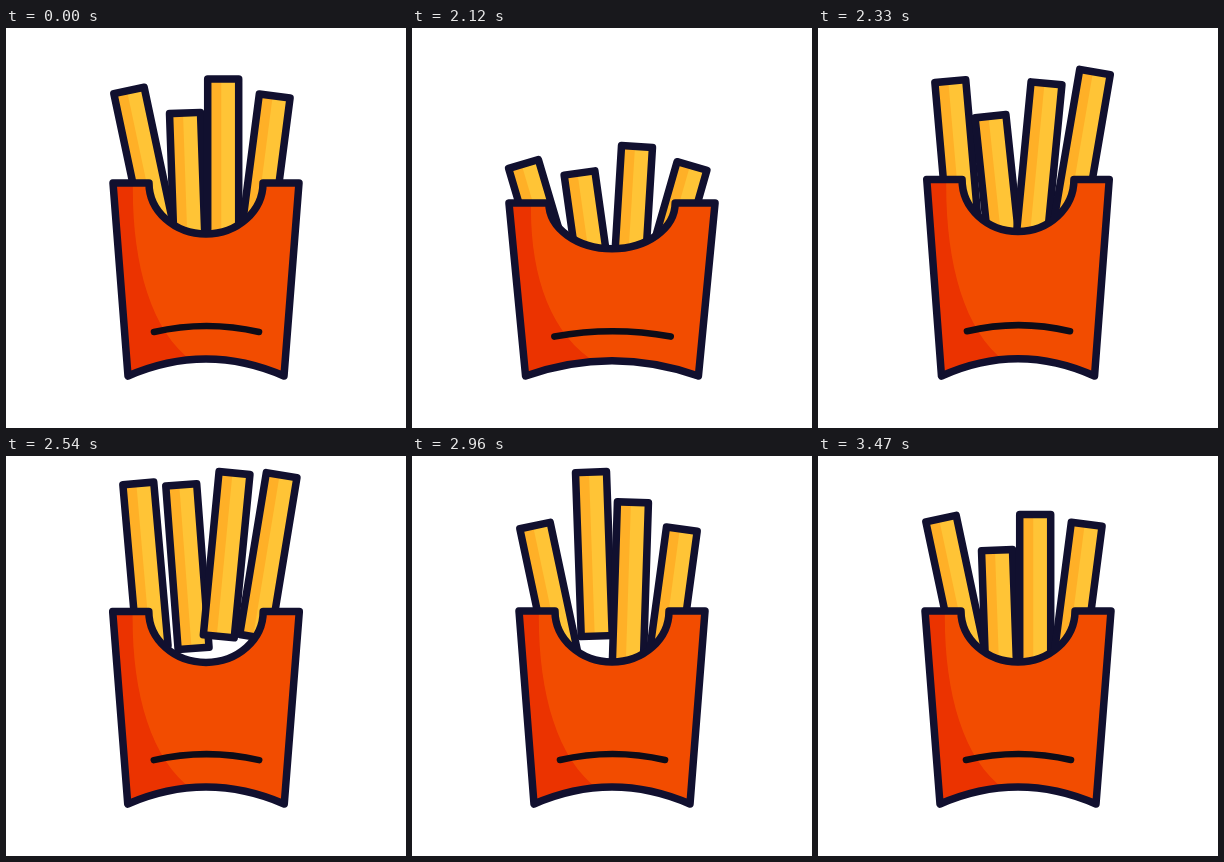
Write an HTML page with a canvas that moves like this. It is 400x400 px and loops after 3500 ms.

```html
<!DOCTYPE html>
<html lang="en">
<head>
<meta charset="utf-8">
<title>Jumping fries</title>
<style>
  html, body { margin: 0; width: 100%; height: 100%; overflow: hidden; background: #fff; }
  canvas { display: block; width: 400px; height: 400px; }
</style>
</head>
<body>
<canvas id="stage" width="400" height="400"></canvas>
<script>
const ctx = document.getElementById('stage').getContext('2d');

// Times in ms.
const LOOP = 3500, START = 2030, STEP = 30;
const CROUCH_FROM = 2000, CROUCH_TO = 2120, LAUNCH = 150, LEAP_AT = 2330;
const GRAVITY = 4e-4, BOUNCE = 80;

const INK = '#11102f', LINE = 7.5;
const WIDTH = 31, LENGTH = 164;

// Poses give the top centre and the tilt in degrees; in the air, gravity sets y.
const fries = [
  { rest: { x: 123, y: 62.5, tilt: -12 }, crouch: { x: 111.5, y: 136, tilt: -16.5 },
    air: { x: 132.3, tilt: -5 }, apex: 2588, top: 26.5, sink: 0, turn: [2800, 2960] },
  { rest: { x: 179, y: 85, tilt: -2 }, crouch: { x: 167.5, y: 145, tilt: -8 },
    air: { x: 172.5, tilt: -6 }, apex: 2788, top: 4.3, sink: 4, turn: [LEAP_AT, 2800] },
  { rest: { x: 217.2, y: 51, tilt: 0 }, crouch: { x: 225, y: 118.5, tilt: 3.5 },
    air: { x: 228.5, tilt: 5.5 }, apex: 2663, top: 11, sink: 7, turn: [2800, 3060] },
  { rest: { x: 268.7, y: 68, tilt: 7.4 }, crouch: { x: 280, y: 138, tilt: 16 },
    air: { x: 277, tilt: 9.7 }, apex: 2583, top: 18.4, sink: 0, turn: [LEAP_AT, 3150] }
];

const mix = (a, b, u) => a + (b - a) * u;
const mixPose = (a, b, u) => ({
  x: mix(a.x, b.x, u), y: mix(a.y, b.y, u), tilt: mix(a.tilt, b.tilt, u)
});

function ease(t, from, to) {
  const u = Math.min(1, Math.max(0, (t - from) / (to - from)));
  return u * u * (3 - 2 * u);
}

// Free flight, then a damped dip that starts at landing speed.
function flightHeight({ rest, apex, top, sink }, t) {
  const floor = rest.y + sink;
  const fall = Math.sqrt((floor - top) / GRAVITY);
  const landed = t - apex - fall;
  if (landed < 0) return top + GRAVITY * (t - apex) ** 2;
  return floor + 2 * GRAVITY * fall * landed * Math.exp(-landed / BOUNCE);
}

function fryPose(fry, t) {
  if (t < CROUCH_TO) return mixPose(fry.rest, fry.crouch, ease(t, CROUCH_FROM, CROUCH_TO));
  const flight = mixPose(fry.air, fry.rest, ease(t, ...fry.turn));
  flight.y = flightHeight(fry, t);
  return mixPose(fry.crouch, flight, ease(t, CROUCH_TO, CROUCH_TO + LAUNCH));
}

function squash(t) {
  if (t < CROUCH_TO) return ease(t, CROUCH_FROM, CROUCH_TO);
  const since = t - CROUCH_TO;
  return Math.exp(-since / 120) * Math.cos(Math.PI * since / 210);
}

function stroke(path, color = INK, width = LINE) {
  ctx.strokeStyle = color;
  ctx.lineWidth = width;
  ctx.lineJoin = ctx.lineCap = 'round';
  ctx.stroke(path);
}

const stick = new Path2D();
stick.rect(-WIDTH / 2, 0, WIDTH, LENGTH);

function drawFry({ x, y, tilt }) {
  ctx.save();
  ctx.translate(x, y);
  ctx.rotate(tilt * Math.PI / 180);
  ctx.fillStyle = '#ffc436';
  ctx.fill(stick);
  ctx.fillStyle = '#ffb027';
  ctx.fillRect(-WIDTH / 2, 0, 13.5, LENGTH);
  stroke(stick);
  ctx.restore();
}

const box = new Path2D();
box.moveTo(107, 155);
box.lineTo(143, 155);
box.ellipse(200, 155, 57, 51, 0, Math.PI, 0, true);
box.lineTo(293, 155);
box.lineTo(278, 348);
box.quadraticCurveTo(200, 314, 122, 348);
box.closePath();

const shade = new Path2D('M100 150H127C125 230 143 302 187 334L120 360H100Z');
const mouth = new Path2D('M148 304Q200.5 292 253 304');

// Scales a path without scaling the line later drawn along it.
function scaled(path, matrix) {
  const result = new Path2D();
  result.addPath(path, matrix);
  return result;
}

function drawBox(amount) {
  const matrix = new DOMMatrix()
    .translate(200, 348)
    .scale(1 + 0.108 * amount, 1 - 0.104 * amount)
    .translate(-200, -348);
  const body = scaled(box, matrix);
  ctx.fillStyle = '#f24c00';
  ctx.fill(body);
  ctx.save();
  ctx.clip(body);
  ctx.fillStyle = '#eb3300';
  ctx.fill(scaled(shade, matrix));
  ctx.restore();
  stroke(body);
  stroke(scaled(mouth, matrix), '#0d0c18', 6.6);
}

function draw(now) {
  const time = now % LOOP;
  const t = time < START ? 0 : START + Math.floor((time - START) / STEP) * STEP;
  ctx.fillStyle = '#fff';
  ctx.fillRect(0, 0, 400, 400);
  fries.forEach(fry => drawFry(fryPose(fry, t)));
  drawBox(squash(t));
}

let origin;
function tick(now) {
  origin ??= now;
  draw(now - origin);
  requestAnimationFrame(tick);
}
draw(0);
requestAnimationFrame(tick);
</script>
</body>
</html>
```
